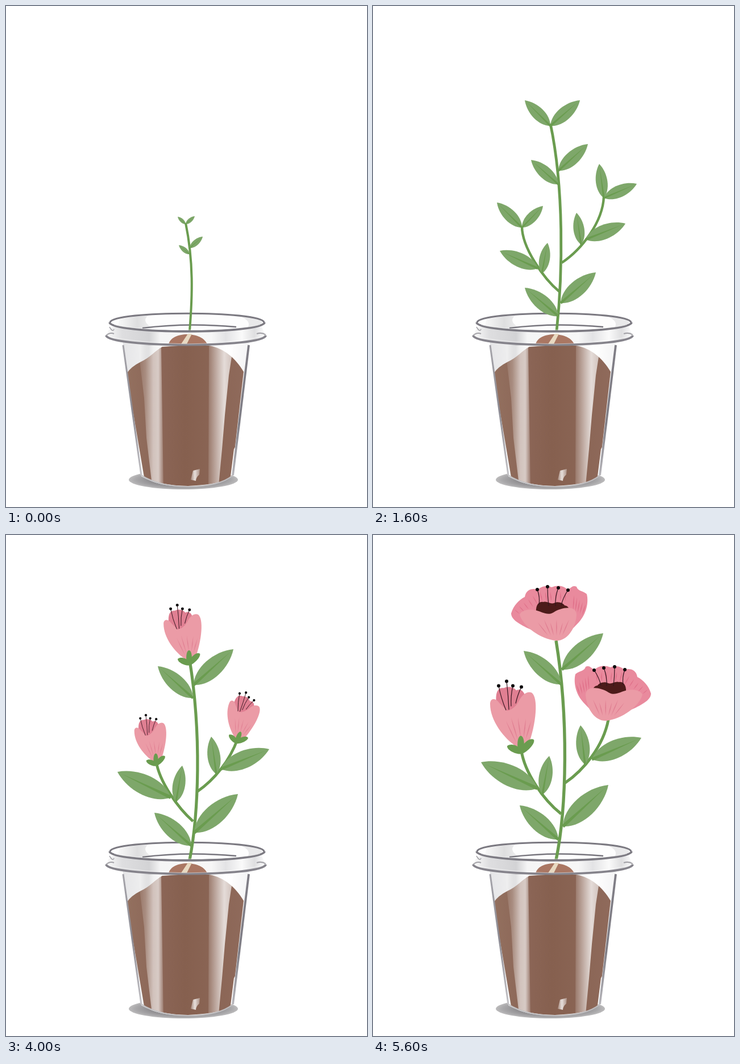
These frames come from a looping animation (635x882 px, 6400 ms). An HTML page with a canvas:

```html
<!DOCTYPE html>
<html lang="en">
<head>
<meta charset="utf-8">
<title>Growing plant</title>
<style>
html, body { margin: 0; width: 100%; height: 100%; overflow: hidden; background: #fff; }
canvas { display: block; }
</style>
</head>
<body>
<canvas id="stage" width="635" height="882"></canvas>
<script>
const ctx = document.getElementById('stage').getContext('2d');
const STEP = 800;
const GREEN = '#6a9c4f', LEAF = '#7ea76a', PINK = '#eb9ba6', ROSE = '#e07f92', INK = '#0c0a0c';

function fill(d, color) {
  ctx.fillStyle = color;
  ctx.fill(new Path2D(d));
}

function line(d, color, width) {
  ctx.strokeStyle = color;
  ctx.lineWidth = width;
  ctx.stroke(new Path2D(d));
}

function blend(x0, y0, x1, y1, ...stops) {
  const g = ctx.createLinearGradient(x0, y0, x1, y1);
  stops.forEach(([at, color]) => g.addColorStop(at, color));
  return g;
}

function placed(x, y, angle, sx, sy, draw) {
  ctx.save();
  ctx.translate(x, y);
  ctx.rotate(angle);
  ctx.scale(sx, sy);
  draw();
  ctx.restore();
}

// Leaves run from base to tip along a unit axis.
function leaf([x, y, tipX, tipY]) {
  const size = Math.hypot(tipX - x, tipY - y);
  placed(x, y, Math.atan2(tipY - y, tipX - x), size, size, () => {
    fill('M0 0C.22-.23 .7-.22 1 0C.7 .22 .22 .23 0 0Z', LEAF);
    fill('M0-.028L.92 0L0 .028Z', GREEN);
  });
}

function streak(x0, y0, x1, y1, color = ROSE) {
  const mx = (x0 + x1) / 2, my = (y0 + y1) / 2;
  fill(`M${x0} ${y0}Q${mx - 2} ${my} ${x1} ${y1}Q${mx + 1.5} ${my} ${x0} ${y0}Z`, color);
}

function stamen(x0, y0, x1, y1, bend) {
  line(`M${x0} ${y0}Q${x0 + bend} ${(y0 + y1) / 2} ${x1} ${y1}`, '#35151f', 1.2);
  ctx.fillStyle = INK;
  ctx.beginPath();
  ctx.arc(x1, y1, 3, 0, 7);
  ctx.fill();
}

function bud(x, y, size, angle = 0) {
  placed(x, y, angle, size, size, () => {
    fill('M-42-70C-46-90-42-104-30-102C-24-106-12-104-8-98C0-102 6-96 8-86L-6-50L-30-52Z', ROSE);
    fill('M-6 2C-30-13-54-45-54-74C-54-86-43-84-38-76C-34-72-28-66-24-62C-14-64-7-72-3-80' +
      'C3-92 12-97 19-94C31-86 28-40 12 2Z', PINK);
    streak(-8, -6, -26, -44);
    streak(-5, -10, -17, -50);
    streak(0, -14, -5, -50);
    streak(5, -14, 9, -48);
    streak(9, -12, 18, -44);
    stamen(-26, -63, -39, -106, -9);
    stamen(-21, -64, -25, -114, -1);
    stamen(-17, -70, -14, -106, -1);
    stamen(-9, -75, 1, -104, 3);
    fill('M0 14C-9 15-25 7-24 0C-18-5-6-2 0 6Z', GREEN);
    fill('M0 14C9 13 26-4 23-11C16-16 4-4 0 4Z', GREEN);
    fill('M-4 12C-8-4-5-18 0-18C5-18 8-4 4 12Z', GREEN);
  });
}

function bloom(x, y, flip) {
  placed(x, y, 0, flip, 1, () => {
    fill('M-50-21C-64-28-79-36-79-47C-75-61-65-71-55-76C-53-88-44-92-32-89C-24-96-14-96-8-93' +
      'C4-98 14-95 20-89C26-90 28-98 36-94C38-86 47-87 54-81C58-65 52-46 43-35C36-26 20-10 0 0Z', '#e98a9d');
    for (let i = 0; i < 5; i++) {
      streak(-64 + i * 8, -46 - i * 4, -73 + i * 8, -54 - i * 6, '#df7089');
      streak(30 + i * 4, -52 + i * 2, 32 + i * 5, -79 + i * 4, '#df7089');
    }
    for (let i = 0; i < 6; i++) streak(-24 + i * 8, -68, -28 + i * 9, -85, '#df7089');
    fill('M-35-50C-36-62-30-69-22-67C-16-69-10-63-4-65C4-69 12-65 15-61C22-60 25-54 22-48L0-40Z', '#4d1b1a');
    fill('M-64-45C-60-54-44-55-34-52C-25-50-15-42-4-49C10-58 36-62 36-44C34-18 18 2 0 1C-28-2-58-24-64-45Z', PINK);
    for (let i = 0; i < 6; i++) streak(-14 + i * 5, -8, -32 + i * 11, -31 - (i % 2) * 5);
    stamen(-30, -62, -33, -89, 2);
    stamen(-13, -60, -15, -94, -2);
    stamen(-1, -60, 4, -92, -1);
    stamen(9, -61, 21, -88, 3);
  });
}

const sprout = [
  [316, 384, 302, 371], [316, 384, 332, 370], [323, 426, 346, 406], [323, 437, 304, 421]
];
const stemLeaves = [
  [326, 290, 378, 243], [326, 314, 278, 271], [326, 546, 267, 496], [330, 523, 392, 469]
];
const topLeaves = [[312, 211, 267, 166], [312, 211, 364, 166]];
const leftLeaves = [[290, 462, 223, 431], [297, 471, 307, 417]];
const leftTip = [[262, 390, 218, 346], [262, 390, 299, 352]];
const rightLeaves = [
  [406, 338, 398, 278], [406, 338, 464, 313], [366, 420, 358, 364], [374, 411, 444, 383]
];
const tallLeaves = [
  [330, 264, 400, 201], [329, 287, 267, 231], [370, 421, 361, 355], [378, 412, 463, 377],
  [290, 462, 196, 417], [299, 470, 310, 406], [326, 547, 261, 489], [331, 524, 408, 456]
];
const fullLeaves = [
  [333, 237, 406, 173], [332, 263, 266, 204], [374, 404, 366, 335], [386, 395, 473, 357],
  [290, 446, 191, 400], [299, 457, 311, 389], [327, 536, 259, 476], [335, 513, 415, 440]
];

const LEFT = 'M328 503C300 480 262 425 262 388';
const RIGHT = 'M332 452C368 428 404 380 406 336';
const MAIN = 'M323 572C334 470 336 320 ';

function plant(stems, leaves, width = 4.8) {
  stems.forEach((d, i) => line(d, GREEN, i ? width - .4 : width));
  leaves.forEach(leaf);
}

function fullPlant() {
  plant(['M323 572C342 480 345 320 323 186', 'M332 491C300 466 268 418 262 380',
    'M338 437C372 414 406 372 415 325'], fullLeaves, 5.4);
  bud(261, 371.5, 1);
}

const stages = [
  () => plant(['M323 572C328 510 330 450 316 382'], sprout, 4),
  () => placed(323, 570, 0, .835, .835, () => {
    ctx.translate(-323, -570);
    plant([MAIN + '312 207', LEFT], [...stemLeaves, ...topLeaves, ...leftLeaves, ...leftTip]);
  }),
  () => plant([MAIN + '312 207', LEFT, RIGHT],
    [...stemLeaves, ...topLeaves, ...leftLeaves, ...leftTip, ...rightLeaves]),
  () => {
    plant([MAIN + '317 240', LEFT, RIGHT], [...stemLeaves, ...leftLeaves, ...leftTip, ...rightLeaves]);
    bud(316, 238, .7);
  },
  () => {
    ctx.translate(.6, 0);
    plant([MAIN + '317 240', LEFT, RIGHT], [...stemLeaves, ...leftLeaves, ...rightLeaves]);
    bud(316, 239, .7);
    bud(261.5, 392, .6);
  },
  () => {
    plant(['M323 572C339 490 344 350 323 220', 'M329 504C302 480 270 435 264 398',
      'M336 452C368 430 394 396 407 360'], tallLeaves, 5.2);
    bud(322, 218, .83);
    bud(263.5, 397, .7);
    bud(408, 358, .7, .39);
  },
  () => {
    fullPlant();
    bud(324, 185, 1);
    bud(417, 333, 1, .39);
  },
  () => {
    ctx.translate(-1, 0);
    fullPlant();
    bloom(323, 185, 1);
    bloom(411, 326, -1);
  }
];

const BODY = 'M205 590L238 828Q270 847 320 846Q376 846 399 827L428 590Z';
const white = a => `rgba(255,255,255,${a})`;

function cupBack() {
  placed(312, 834, 0, 96, 17, () => {
    const shade = ctx.createRadialGradient(0, 0, .5, 0, 0, 1);
    shade.addColorStop(0, '#858386');
    shade.addColorStop(.75, '#a9a8aa');
    shade.addColorStop(1, '#bcbbbc');
    ctx.fillStyle = shade;
    ctx.beginPath();
    ctx.arc(0, 0, 1, 0, 7);
    ctx.fill();
  });
  fill('M182 557C188 536 449 536 455 557C449 578 188 578 182 557Z', '#fdfdfd');
  fill('M200 551Q228 546 250 545Q236 556 262 569Q222 568 197 563Z',
    blend(200, 0, 262, 0, [0, '#f6f6f6'], [.5, '#dededf'], [1, '#f4f4f4']));
  fill('M412 546Q445 549 451 557Q446 564 424 567Q434 556 412 546Z', '#e9e9ea');
  line('M183 557C188 536 449 536 454 557', '#7b7981', 3.2);
  line('M240 567Q318 557 405 565', '#77757d', 2.4);
}

function cupFront() {
  fill(BODY, blend(207, 0, 429, 0, [0, '#e6e6e8'], [.13, '#ededee'], [.2, '#cfcfd1'], [.3, '#f4f4f4'],
    [.68, '#e4e4e5'], [.82, '#fff'], [1, '#f3f3f4']));
  fill('M180 571Q184 566 190 565Q318 580 450 565L457 581Q440 596 318 596Q195 596 176 581Z',
    blend(176, 0, 457, 0, [0, '#fbfbfb'], [.1, '#dedee0'], [.27, '#d3d3d5'], [.34, '#f5f5f5'],
      [.66, '#f7f7f7'], [.75, '#e3e3e5'], [.85, '#fafafa'], [.93, '#dedee0'], [1, '#fff']));
  fill('M286 596C290 572 346 572 354 596Z', '#aa7763');
  fill('M320 577L327 577L318 595L308 595Z', '#e8d9c1');

  fill('M212 647Q220 635 236 627C254 619 263 606 275 600Q318 596 358 598C384 603 404 620 418 644' +
    'L397 828Q384 842 320 845Q270 844 243 829Z',
    blend(212, 0, 418, 0, [0, '#93705f'], [.3, '#8b6556'], [.5, '#86604f'], [1, '#8f6a5b']));

  ctx.save();
  ctx.clip(new Path2D(BODY));
  fill('M232 598L273 598L277 848L257 844L247 760L243 690Z',
    blend(232, 0, 277, 0, [0, white(.04)], [.3, white(.24)], [.6, white(.6)], [.8, white(.66)], [1, white(.15)]));
  fill('M357 598L400 598L392 650L385 720L380 780L374 844L356 846Z',
    blend(356, 0, 396, 0, [0, white(.14)], [.35, white(.46)], [.7, white(.77)], [1, white(.62)]));
  ctx.restore();

  fill('M329 818L341 815L340 825Q334 830 334 836L325 834Z',
    blend(325, 0, 341, 0, [0, white(.25)], [.45, white(.8)], [1, white(.3)]));
  fill('M231 768L239 824L242 828L234 780Z', '#fff');
  fill('M404 775L399 824L395 828L401 780Z', '#fff');
  line('M206 597L238 826', blend(0, 597, 0, 826, [0, '#a6a5ab'], [.5, '#8d8b93'], [1, '#c4c3c7']), 3);
  line('M427 597L399 826', blend(0, 597, 0, 826, [0, '#7f7d85'], [.6, '#807e86'], [1, '#b7b6bb']), 3.8);
  line('M238 826Q270 846 320 846Q376 846 399 826', '#c1bfc1', 1.8);

  line('M182 557C187 578 450 578 455 557', '#7c7a82', 3.8);
  line('M190 561C225 573 411 573 447 561', white(.45), 1);
  line('M176 580C182 602 452 602 457 580', '#85838b', 4);
  line('M184 583Q250 594 318 595Q395 594 448 582', white(.45), 1.2);
  line('M182 565Q188 575 190 569', '#a4a3a8', 1.5);
  line('M176 580Q183 574 190 577M457 579Q450 574 441 577', '#a4a3a8', 2);
}

function render(now) {
  ctx.setTransform(1, 0, 0, 1, 0, 0);
  ctx.fillStyle = '#fff';
  ctx.fillRect(0, 0, 635, 882);
  cupBack();
  ctx.save();
  stages[Math.floor(now / STEP) % stages.length]();
  ctx.restore();
  cupFront();
  requestAnimationFrame(render);
}

render(performance.now());
</script>
</body>
</html>
```
